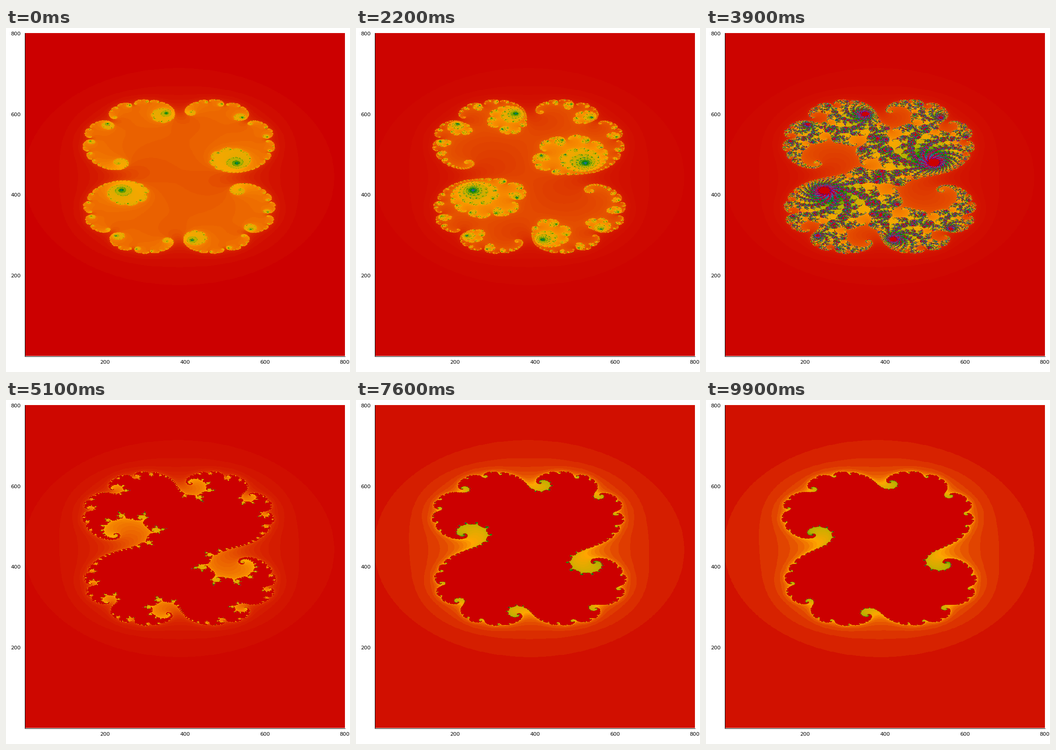
Write a matplotlib script that moves like this. It is 748 by 749 pixels and loops after 10 s.

```python
import matplotlib.pyplot as plt
import numpy as np
from matplotlib.animation import FuncAnimation
from matplotlib.lines import Line2D

W, H, DPI = 748, 749, 100
LEFT, TOP, RIGHT, BOTTOM = 42, 11, 737, 714
PLOT_W, PLOT_H = RIGHT - LEFT, BOTTOM - TOP
FRAMES, INTERVAL = 100, 100

SIZE, STRIP = 800, 100     # grid cells per side, rows handled at once
LIMIT, CHUNK, PATIENCE = 256, 4, 10
RE, IM_START, IM_STEP = 0.285, 0.005, 0.0002

STOPS = np.array([
    (204, 0, 0), (255, 165, 0), (178, 178, 0), (0, 128, 0),
    (0, 139, 139), (138, 43, 226), (0, 0, 139),
])

xs = np.linspace(-1.3, 1.4, SIZE, endpoint=False, dtype=np.float32)
ys = np.linspace(-2.5, 2.0, SIZE, endpoint=False, dtype=np.float32)
GRID_X, GRID_Y = (g.reshape(-1, STRIP * SIZE) for g in np.meshgrid(xs, ys))


def nearest(pixels):
    """Grid cell under each pixel; the plot area starts half a pixel early."""
    cells = (np.arange(pixels) + 1) * SIZE // pixels
    return np.minimum(cells, SIZE - 1)


SAMPLE = np.ix_(nearest(PLOT_H), nearest(PLOT_W))


def escape_strip(x, y, cx, cy):
    """Steps until |z| > 2 under z -> z*z + c; 0 where z stays bounded."""
    total = np.zeros(x.size, np.uint8)
    where = np.arange(x.size)
    x, y, n = x.copy(), y.copy(), total.copy()
    before, idle = x.size, 0
    for _ in range(0, LIMIT, CHUNK):
        xx, yy = np.empty_like(x), np.empty_like(y)
        inside = np.empty(x.size, bool)
        for _ in range(CHUNK):
            np.multiply(x, x, out=xx)
            np.multiply(y, y, out=yy)
            y *= x
            y += y
            y += cy
            np.subtract(xx, yy, out=x)
            x += cx
            xx += yy
            np.less_equal(xx, 4, out=inside)
            n += inside.view(np.uint8)
        alive = np.count_nonzero(inside)
        idle = idle + 1 if alive == before else 0
        before = alive
        if alive == 0 or idle == PATIENCE:
            break
        if alive < 0.85 * x.size:
            total[where] = np.maximum(n, 1)
            where, x, y, n = where[inside], x[inside], y[inside], n[inside]
            inside = np.ones(x.size, bool)
    n = np.maximum(n, 1)
    n[inside] = 0
    total[where] = n
    return total


def julia(c):
    cx, cy = np.float32(c.real), np.float32(c.imag)
    with np.errstate(all="ignore"):
        strips = [escape_strip(x, y, cx, cy) for x, y in zip(GRID_X, GRID_Y)]
    return np.concatenate(strips).reshape(SIZE, SIZE)


def colorize(counts):
    lo, hi = int(counts.min()), int(counts.max())
    t = (np.arange(256) - lo) / max(hi - lo, 1)
    knots = np.linspace(0, 1, len(STOPS))
    lut = np.stack([np.interp(t, knots, ch) for ch in STOPS.T], axis=1)
    return np.round(lut).astype(np.uint8)[counts[SAMPLE]]


fig = plt.figure(figsize=(W / DPI, H / DPI), dpi=DPI, facecolor="white")
ax = fig.add_axes([LEFT / W, 1 - BOTTOM / H, PLOT_W / W, PLOT_H / H])
ax.axis("off")
image = ax.imshow(np.zeros((PLOT_H, PLOT_W, 3), np.uint8), origin="lower",
                  aspect="auto", interpolation="nearest")


def label(x, y, text, ha):
    fig.text(x / W, 1 - y / H, text, ha=ha, va="baseline", color="black",
             family="DejaVu Sans", fontsize=11.5 * 72 / DPI)


def rule(x0, y0, x1, y1):
    fig.add_artist(Line2D([x0 / W, x1 / W], [1 - y0 / H, 1 - y1 / H],
                          color="black", lw=72 / DPI))


for value in range(200, SIZE + 1, 200):
    part = value / SIZE
    label(LEFT - 0.5 + part * PLOT_W, 731, str(value), "center")
    label(31.8, BOTTOM + 0.5 - part * PLOT_H + 4.3, str(value), "right")

# Lines snap to the pixel column or row just outside the plot.
axis_x, axis_y = LEFT - 0.8, BOTTOM + 0.8
rule(axis_x, TOP, axis_x, axis_y)
rule(axis_x, axis_y, RIGHT, axis_y)


def update(i):
    image.set_data(colorize(julia(complex(RE, IM_START + IM_STEP * i))))
    return (image,)


anim = FuncAnimation(fig, update, frames=FRAMES, interval=INTERVAL,
                     repeat=True, repeat_delay=0, blit=False)
plt.show()
```
